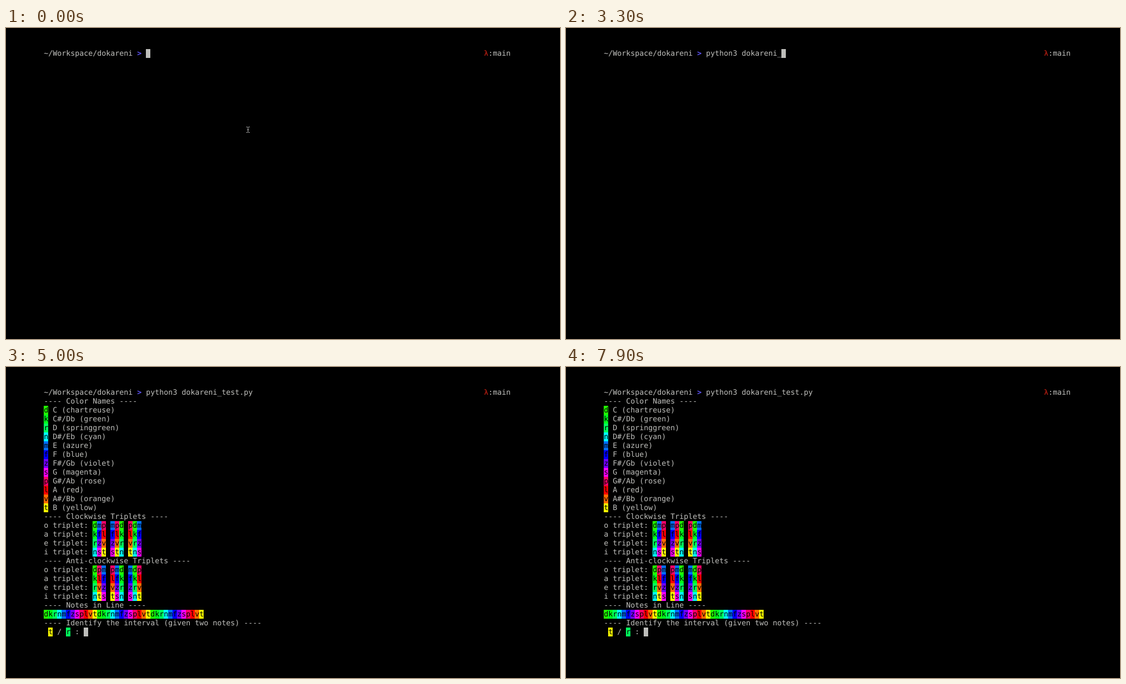
Write an HTML page that moves like this. It is 998 px wide and 561 px high and loops after 8000 ms.

```html
<!DOCTYPE html>
<html lang="en">
<head>
<meta charset="utf-8">
<title>Terminal</title>
<style>
  html, body { margin: 0; width: 100%; height: 100%; overflow: hidden; background: #000; }
  pre {
    position: absolute; top: 39px; margin: 0; color: #c0c0bd;
    font: 13.3px/16px "DejaVu Sans Mono", monospace;
    font-variant-ligatures: none; text-rendering: geometricPrecision;
  }
  #screen { left: 68.2px; }
  #branch { left: 861px; }
  #branch b { color: #96190f; }
  .arrow { color: #5f55f5; }
  /* cells sit one pixel above the text line box */
  .cell {
    display: inline-block; position: relative; top: -1px; width: 1ch; height: 15px;
    padding-top: 1px; vertical-align: top; color: #000;
  }
  .cursor { background: #bebebb; }
  #mouse { position: absolute; left: 432px; top: 177px; }
</style>
</head>
<body>
<pre id="screen"><span>~/Workspace/dokareni <b class="arrow">&gt;</b> </span><span id="typed"></span><span id="caret" class="cell cursor"></span><span id="output"></span></pre>
<pre id="branch"><b>λ</b>:main</pre>
<svg id="mouse" width="8" height="13" fill="none" stroke="#b4b4b4">
  <path d="M1 1.5H3L4 2.5L5 1.5H7M1 11.5H3L4 10.5L5 11.5H7M4 2.5V10.5M2.5 6.5H5.5"/>
</svg>
<script>
const LOOP = 8000, RUN_AT = 5000;
const COMMAND = "python3 dokareni_test.py ";

// [start time, characters shown before, characters shown after], one key per 100 ms
const BURSTS = [[200, 0, 6], [1700, 6, 8], [2500, 8, 11], [3600, 17, 21], [4200, 21, 24], [4600, 24, 25]];
const COMPLETED = { at: 2800, length: 17 };

const NOTES = [
  ["d", "C", "chartreuse", "#22ff00"],
  ["k", "C#/Db", "green", "#00ff1c"],
  ["r", "D", "springgreen", "#00ff5c"],
  ["n", "D#/Eb", "cyan", "#00ffff"],
  ["m", "E", "azure", "#006fff"],
  ["f", "F", "blue", "#0000ff"],
  ["z", "F#/Gb", "violet", "#6f00ff"],
  ["s", "G", "magenta", "#ff00ff"],
  ["p", "G#/Ab", "rose", "#fa0068"],
  ["l", "A", "red", "#ff0000"],
  ["v", "A#/Bb", "orange", "#ff6a00"],
  ["t", "B", "yellow", "#ffff00"]
];
const COLORS = Object.fromEntries(NOTES.map(n => [n[0], n[3]]));
const SCALE = NOTES.map(n => n[0]).join("");

const $ = id => document.getElementById(id);
const paint = text => text.replace(/\S/g, c => `<span class="cell" style="background:${COLORS[c]}">${c}</span>`);
const title = text => `---- ${text} ----`;
const rotate = (s, n) => s.slice(n) + s.slice(0, n);

function triplets(step) {
  return [..."oaei"].map((vowel, i) => {
    const base = [0, 1, 2].map(k => SCALE[(i + k * step) % 12]).join("");
    return `${vowel} triplet: ` + paint([0, 1, 2].map(n => rotate(base, n)).join(" "));
  });
}

$("output").innerHTML = "\n" + [
  title("Color Names"),
  ...NOTES.map(([key, name, color]) => `${paint(key)} ${name} (${color})`),
  title("Clockwise Triplets"),
  ...triplets(4),
  title("Anti-clockwise Triplets"),
  ...triplets(8),
  title("Notes in Line"),
  paint(SCALE.repeat(3)),
  title("Identify the interval (given two notes)"),
  ` ${paint("t")} / ${paint("r")} : <span class="cell cursor"></span>`
].join("\n");

function typedLength(t) {
  let length = 0;
  for (const [start, from, to] of BURSTS) {
    if (t >= start) length = Math.min(to, from + 1 + Math.floor((t - start) / 100));
  }
  return t >= COMPLETED.at ? Math.max(length, COMPLETED.length) : length;
}

function draw() {
  const t = performance.now() % LOOP;
  const running = t >= RUN_AT;
  $("typed").textContent = COMMAND.slice(0, typedLength(t));
  $("caret").style.display = running ? "none" : "";
  $("output").style.display = running ? "" : "none";
  $("mouse").style.display = t < BURSTS[0][0] ? "" : "none";
  requestAnimationFrame(draw);
}
draw();
</script>
</body>
</html>
```
